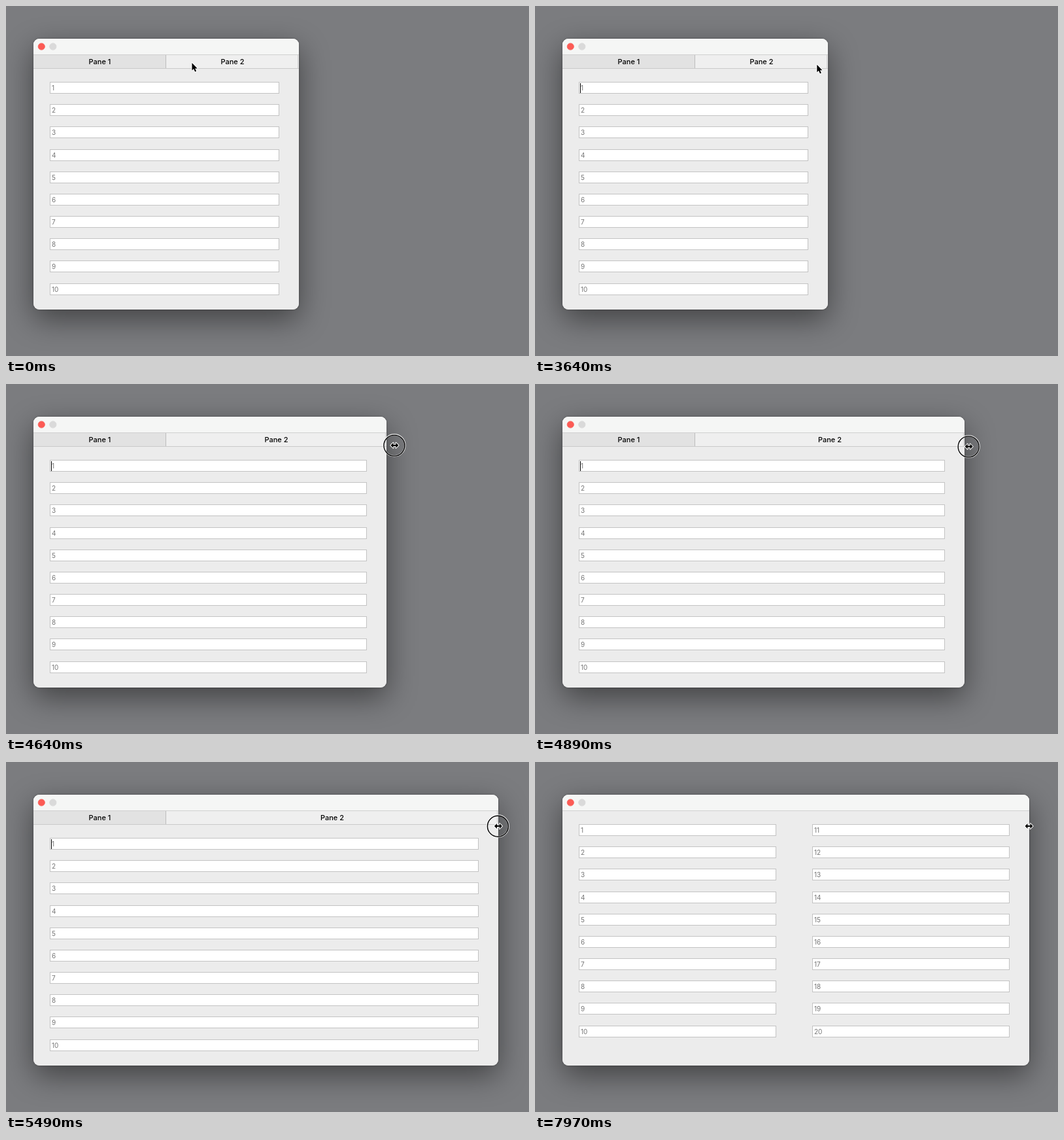
An HTML page with a canvas that plays this animation: 800 by 535 pixels, repeating every 8.69 s.

```html
<!DOCTYPE html>
<html lang="en">
<head>
<meta charset="utf-8">
<title>Responsive panes</title>
<style>
html, body { margin: 0; height: 100%; overflow: hidden; background: #7b7c7f; }
canvas { display: block; }
</style>
</head>
<body>
<canvas id="stage" width="800" height="535"></canvas>
<script>
const c = document.getElementById("stage").getContext("2d");
const LOOP = 8690, LEFT = 42, TOP = 50, BOTTOM = 464, SPLIT = 244;
const clicks = [[640, 1090], [2190, 2490], [4040, 5590]];
const blinks = [90, 1640, 2040, 2590, 3090, 3970, 4440, 6140, 6440, 7040, 7440, 7970];

const during = (t, a, b) => t >= a && t < b;

// 0 to 1 between two times, slowing down towards the end
function ease(t, start, end) {
  const u = Math.min(1, Math.max(0, (t - start) / (end - start)));
  return 1 - (1 - u) ** 1.84;
}

function rect(x, y, w, h, color) {
  c.fillStyle = color;
  c.fillRect(x, y, w, h);
}

function text(s, x, y, font, color, align = "left") {
  c.font = font + ' Inter, "Open Sans", sans-serif';
  c.fillStyle = color;
  c.textAlign = align;
  c.fillText(s, x, y);
}

function ring(x, y, r, width, color) {
  c.beginPath();
  c.arc(x, y, r, 0, 7);
  c.lineWidth = width;
  c.strokeStyle = color;
  c.stroke();
}

function button(x, fill, line) {
  ring(x, 62, 5.1, 0.7, line);
  c.fillStyle = fill;
  c.fill();
}

function shadow(color, blur, dy) {
  c.shadowColor = color;
  c.shadowBlur = blur;
  c.shadowOffsetY = dy;
}

function frame(right) {
  const shape = new Path2D();
  shape.roundRect(LEFT, TOP, right - LEFT, BOTTOM - TOP, 9);
  c.fillStyle = "#ececec";
  c.save();
  shadow("rgba(0,0,0,.47)", 46, 15);
  c.fill(shape);
  shadow("rgba(0,0,0,.3)", 3, 0);
  c.fill(shape);
  c.clip(shape);
  shadow("transparent", 0, 0);
  rect(LEFT, TOP, right - LEFT, 24, "#f5f6f5");
  rect(LEFT, 74, right - LEFT, 1, "#d0d0d0");
  c.restore();
  button(54.3, "#fc5b55", "#ee514b");
  button(71.8, "#dadada", "#cecece");
}

function tabs(right, dark1, dark2) {
  const shade = dark => dark ? "#e2e2e2" : "#efefef";
  rect(LEFT, 75, SPLIT - LEFT, 20, shade(dark1));
  rect(SPLIT, 75, right - SPLIT, 20, shade(dark2));
  rect(SPLIT, 75, 1, 20, "#bdbdbd");
  rect(right - 2, 75, 1, 20, "#cfcfcf");
  rect(LEFT, 95, right - LEFT, 1, "#cacaca");
  text("Pane 1", 143.5, 89, "500 11px", "#000", "center");
  text("Pane 2", (SPLIT + right) / 2 + 0.5, 89, "500 11px", "#000", "center");
}

function fields(first, x0, x1, top) {
  c.lineWidth = 1;
  c.strokeStyle = "#c3c3c3";
  for (let i = 0; i < 10; i++) {
    const y = Math.round(top + 34.16 * i);
    rect(x0, y, x1 - x0, 18, "#fff");
    c.strokeRect(x0 + 0.5, y + 0.5, x1 - x0 - 1, 17);
    text(first + i, x0 + 3, y + 13, "10px", "#757575");
  }
}

function pointer(points, x, y) {
  c.save();
  c.translate(x, y);
  c.beginPath();
  points.forEach(p => c.lineTo(...p));
  c.closePath();
  c.lineJoin = "round";
  c.lineWidth = 2;
  c.strokeStyle = "#fff";
  c.stroke();
  c.fillStyle = "#000";
  c.fill();
  c.restore();
}

const arrow = [[0, 0], [0, 11.5], [2.6, 9.1], [4.6, 13.6], [6.6, 12.7], [4.7, 8.4], [8.2, 8.4]];
const half = [[-6, 0], [-2, -4], [-2, -1.1], [2, -1.1], [2, -4], [6, 0]];
const resize = half.concat(half.slice(1, 5).reverse().map(([x, y]) => [x, -y]));

function draw(t) {
  // movement comes in 50 ms steps, and the drag hesitates once after its first step
  const step = during(t, 4290, 4440) ? 4290 : Math.floor((t - 40) / 50) * 50 + 40;
  const hover = ease(step, 3040, 3840), drag = ease(step, 4240, 5590);
  const x = 284 - 56 * ease(step, 1590, 2040) + 220 * hover + 307.5 * drag;
  const y = 87 + 3 * hover + 8 * drag;
  const right = Math.round(448 + 308 * ease(step, 4295, 5590));
  const wide = t >= 5790, onEdge = t >= 3840;
  const second = during(t, 1040, 2390);
  const top = wide ? 95.1 : 116.1;

  rect(0, 0, 800, 535, "#7b7c7f");
  frame(right);
  if (wide) {
    fields(1, 67, 369, top);
    fields(11, 424, 726, top);
  } else {
    tabs(right, !second || t >= 2290, second || during(t, 970, 1040));
    fields(second ? 11 : 1, 67, right - 30, top);
  }
  if (blinks.filter(b => b <= t).length % 2) rect(69, Math.round(top) + 2, 1, 15, "#000");

  if (clicks.some(([a, b]) => during(t, a, b))) {
    const r = onEdge ? 16 : 18.7;
    if (onEdge) ring(x - 0.5, y, r + 0.4, 2.6, "rgba(255,255,255,.75)");
    ring(x - 0.5, y + 0.3, r, 1.4, "#000");
  }
  if (during(t, 5890, 5970)) pointer(arrow, x - 0.5, y - 1.5);
  else if (onEdge) pointer(resize, x, y);
  else pointer(arrow, x + 0.5, y);
}

function tick(now) {
  draw(now % LOOP);
  requestAnimationFrame(tick);
}
requestAnimationFrame(tick);
</script>
</body>
</html>
```
